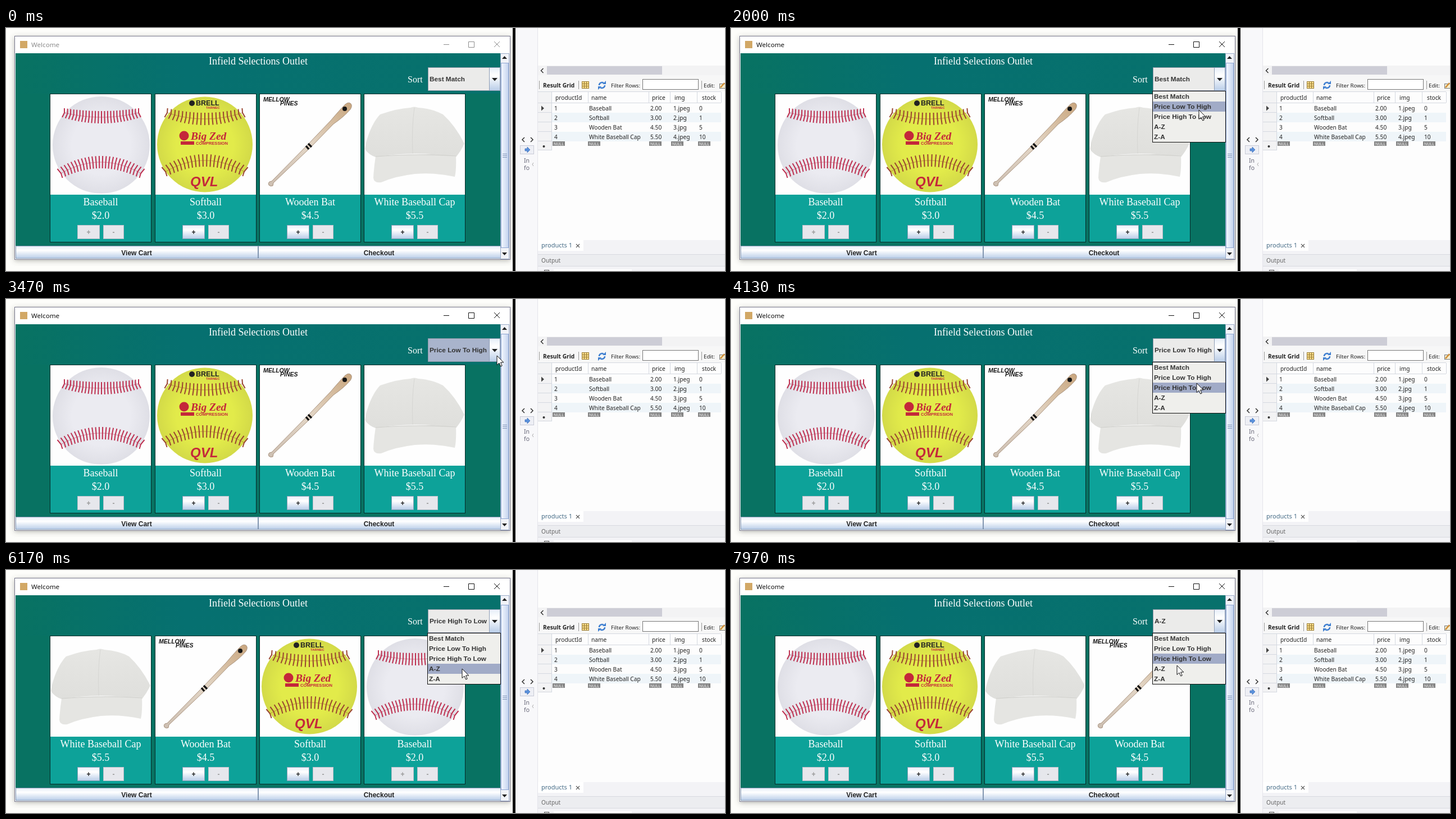
Animation, 1280 px wide and 433 px high, one loop 8 s. Source, as an HTML page:

```html
<!DOCTYPE html>
<html lang="en">
<head>
<meta charset="utf-8">
<title>Store demo</title>
<style>
  html, body { margin: 0; height: 100%; overflow: hidden; background: #fdfdfb; }
  svg { display: block; width: 100vw; height: 100vh; }
  .serif { font-family: "Liberation Serif", Times, serif; }
  .bold { font-family: "Liberation Sans", Arial, sans-serif; font-weight: bold; }
  .ui { font-family: "Noto Sans", "Open Sans", sans-serif; }
  .mid { text-anchor: middle; }
  .strong { font-weight: bold; }
  .italic { font-style: italic; }
</style>
</head>
<body>
<svg id="stage" viewBox="0 0 1280 433" preserveAspectRatio="none">
  <defs>
    <linearGradient id="metal" x2="0" y2="1">
      <stop stop-color="#e6eef8"/><stop offset=".35" stop-color="#fff"/><stop offset="1" stop-color="#b9cde8"/>
    </linearGradient>
    <linearGradient id="thumb">
      <stop stop-color="#f4f8ff"/><stop offset="1" stop-color="#c4d3ee"/>
    </linearGradient>
    <linearGradient id="panel">
      <stop stop-color="#087262"/><stop offset=".35" stop-color="#067070"/><stop offset="1" stop-color="#07716c"/>
    </linearGradient>
    <radialGradient id="white"><stop offset=".6" stop-color="#ebebf1"/><stop offset="1" stop-color="#dfdfe6"/></radialGradient>
    <radialGradient id="lime"><stop offset=".6" stop-color="#e2eb4a"/><stop offset="1" stop-color="#d3da48"/></radialGradient>
    <linearGradient id="wood" x1="0" y1="1" x2="1" y2="0">
      <stop stop-color="#cdbfb2"/><stop offset=".5" stop-color="#e3d6c6"/><stop offset="1" stop-color="#c9a67e"/>
    </linearGradient>
    <linearGradient id="cloth" x2="0" y2="1">
      <stop stop-color="#e6e6e3"/><stop offset="1" stop-color="#dfdfdc"/>
    </linearGradient>
    <filter id="shade" x="-5%" y="-5%" width="110%" height="112%">
      <feDropShadow dx="0" dy="2" stdDeviation="5" flood-color="#55554a" flood-opacity=".4"/>
    </filter>
  </defs>
  <g id="desk"></g><g id="cards"></g><g id="combo"></g>
  <path id="cursor" d="M0 0V16.5L4 13L6.7 19L9.2 18L6.6 12H11.8Z" fill="#fff" stroke="#111"/>
</svg>
<script>
const $ = id => document.getElementById(id);
const text = (x, y, s, size, fill, cls = "ui") =>
  `<text x="${x}" y="${y}" font-size="${size}" fill="${fill}" class="${cls}">${s}</text>`;
const rect = (x, y, w, h, fill, stroke = "none") =>
  `<rect x="${x}" y="${y}" width="${w}" height="${h}" fill="${fill}" stroke="${stroke}"/>`;
const path = (d, stroke, width = 1, fill = "none") =>
  `<path d="${d}" stroke="${stroke}" stroke-width="${width}" fill="${fill}"/>`;
const disc = (x, y, r, fill) => `<circle cx="${x}" cy="${y}" r="${r}" fill="${fill}"/>`;

// Stitches across the parabola y = cy + bend * u², shorter towards its ends
function seam(cx, cy, w, bend, count, color) {
  let d = "", line = "";
  for (let i = 0; i <= count; i++) {
    const u = i / count * 2 - 1, x = cx + u * w, y = cy + bend * u * u;
    const leg = 11 - 3 * u * u, lean = 2 * bend * u / w * leg, splay = u * 2;
    d += `M${x + lean + splay} ${y - leg}L${x} ${y}L${x - lean + splay} ${y + leg}`;
    line += (i ? "L" : "M") + x + " " + y;
  }
  return path(line, color, .5) + path(d, color, 2);
}

const RED = "#c4273a", THREAD = "#bd3050", STITCH = "#9a4530";
const products = {
  ball: { name: "Baseball", price: "$2.0", soldOut: true, art:
    disc(90.5, 90.5, 86.5, "url(#white)") +
    seam(91, 41, 66, -8, 24, THREAD) + seam(90, 121, 71, 20, 25, THREAD) },
  soft: { name: "Softball", price: "$3.0", art:
    disc(88, 89.5, 85, "url(#lime)") +
    seam(88, 44, 67, -11, 20, STITCH) + seam(88, 118, 70, 20, 21, STITCH) +
    disc(65, 16, 5, "#222") + text(72, 20, "BRELL", 12.5, "#222", "bold") +
    text(90, 26, "TARNEC", 6, RED, "bold") +
    disc(51, 74, 8.5, RED) + text(63, 81, "Big Zed", 19.5, RED, "serif strong italic") +
    rect(45, 84, 24, 6, RED) + text(72, 90, "COMPRESSION", 7.6, RED, "bold") +
    text(62, 164, "QVL", 24, RED, "bold italic") },
  bat: { name: "Wooden Bat", price: "$4.5", art:
    path("M16 162Q14 158 17 156L21 155L85 90L126 47Q142 28 152 18Q158 13 162 17Q165 21 161 27Q150 40 131 53L90 95L24 158L23 163Q19 165 16 162Z", "#a8927e", 1, "url(#wood)") +
    path("M82 92L87 98M86 88L92 94", "#151515", 3.5) + disc(151, 26, 4, "#151515") +
    text(6, 13, "MELLOW", 10.5, "#151515", "bold italic") +
    text(36, 20, "PINES", 10.5, "#151515", "bold italic") },
  cap: { name: "White Baseball Cap", price: "$5.5", art:
    path("M1 98C3 80 14 50 28 36Q60 25 82 24Q89 21 96 24Q122 26 140 36Q162 56 178 88Q172 101 163 112Q90 100 20 112Q8 108 1 98Z", "none", 0, "url(#cloth)") +
    path("M89 24Q84 60 86 106", "#d6d6d3", 1) +
    path("M20 111Q90 104 163 109Q164 135 161 147Q125 139 90 142Q55 146 30 157Q17 159 16 149Q17 130 20 111Z", "none", 0, "#e5e5e2") +
    path("M20 111Q90 105 163 110", "#cfcfcb", 1.2) }
};
const orders = [["ball", "soft", "bat", "cap"], ["cap", "bat", "soft", "ball"], ["ball", "soft", "cap", "bat"]];

function button(x, label, on) {
  const w = label == "+" ? 39 : 36;
  return rect(x + .5, 351.5, w, 24, on ? "url(#metal)" : "#e6e7ec", on ? "#8b9fb5" : "#bcbcc8") +
    text(x + .5 + w / 2, 368, label, 12, on ? "#222" : "#999", "bold mid");
}
function card(id, i) {
  const p = products[id], x = [78, 265, 451, 637][i];
  return rect(x + .5, 117.5, 180, 264, "#0da299", "#052a28") + rect(x + 1, 118, 179, 179, "#fefefe") +
    `<g transform="translate(${x + 1} 118)">${p.art}</g>` +
    text(x + 90.5, 316, p.name, 18, "#fff", "serif mid") + text(x + 90.5, 340, p.price, 18, "#fff", "serif mid") +
    button(x + 49, "+", !p.soldOut) + button(x + 95, "-", false);
}

function storeWindow() {
  return `<g filter="url(#shade)">${rect(15.5, 14.5, 882, 398, "#fff", "#77778c")}</g>` +
    rect(25, 23, 13, 13, "#d2a866") +
    `<g id="title">${text(45, 34, "Welcome", 11.6, "currentColor")}` +
    path("M779 29.5h10M823.5 24.5h10v10h-10zM869 24l10 10m0-10l-10 10", "currentColor") + "</g>" +
    rect(17, 45, 863, 343, "#087262") + rect(17, 45, 863, 72, "url(#panel)") +
    text(449, 65, "Infield Selections Outlet", 18, "#fff", "serif mid") +
    text(715, 97, "Sort", 16, "#fff", "serif") +
    rect(17.5, 388.5, 431, 22, "url(#metal)", "#8296b0") + rect(449.5, 388.5, 431, 22, "url(#metal)", "#8296b0") +
    text(232.5, 405, "View Cart", 12, "#222", "bold mid") + text(664, 405, "Checkout", 12, "#222", "bold mid") +
    rect(880.5, 45.5, 15, 366, "#f1f3f8", "#9aabc8") + rect(881.5, 62.5, 13, 329, "url(#thumb)", "#8fa6d2") +
    path("M884 224.5h8m-8 3h8m-8 3h8", "#8296b8") +
    path("M883 55h9l-4.5-5zM883 400h9l-4.5 5z", "none", 0, "#222");
}

function database() {
  const ink = "#222", dim = "#667", grid = "#d4d8e0";
  const cols = [[978, 976, 973], [1042, 1038, 1036], [1150, 1147, 1145], [1190, 1188, 1184], [1239, 1234, 1232]];
  const rows = ["productId name price img stock", "1 Baseball 2.00 1.jpeg 0", "2 Softball 3.00 2.jpg 1",
    "3 Wooden_Bat 4.50 3.jpg 5", "4 White_Baseball_Cap 5.50 4.jpeg 10"];
  let s = rect(907, 0, 39, 433, "#f8f8fa") + rect(946, 0, 334, 433, "#fdfdfd") + rect(902, 0, 5, 433, "#111") +
    rect(946, 67, 334, 17, "#f3f3f4") + rect(963, 68, 205, 15, "#cdcdd6") + rect(946, 84, 334, 29, "#f7f7f7") +
    path("M956.5 72l-4 4 4 4M923 195l-4 4 4 4M934 195l4 4-4 4", "#333", 1.5) +
    rect(915.5, 209.5, 24, 15, "#eeeff5", "#c8cad6") + path("M924 215h4v-3l5 5-5 5v-3h-4z", "#3569b5", .7, "#5b92dc") +
    text(927, 240, "In", 10.5, dim, "ui mid") + text(927, 253, "fo", 10.5, dim, "ui mid") +
    path("M939 240l-2 3 2 3", "#aaa") +
    path("M949.5 94v15M1019.5 94v15M1238.5 94v15", "#999") +
    text(956, 106, "Result Grid", 10.2, ink, "ui strong") +
    rect(1025.5, 95.5, 12, 12, "#f6dc8c", "#9a7b30") + path("M1026 99.5h12m-12 4h12M1029.5 96v12m4-12v12", "#9a7b30") +
    path("M1056 102a5 5 0 0 1 8-4M1066 102a5 5 0 0 1-8 4", "#3f7fd0", 2.5) +
    path("M1062 100h6v-6zM1060 104h-6v6z", "none", 0, "#3f7fd0") +
    text(1077, 106, "Filter Rows:", 9.7, ink) + rect(1133.5, 91.5, 99, 18, "#fff", "#777") +
    text(1242, 106, "Edit:", 9.7, ink) + rect(1270.5, 99.5, 12, 8, "#f4edcf", "#777") +
    path("M1272 106l7-8", "#d18c32", 2.5) +
    rect(947, 114, 24, 104, "#f3f3f4") + rect(971, 151, 302, 17, "#eff5f9") + rect(971, 185, 302, 17, "#eff5f9") +
    path("M947 113.5h326M947 133.5h326M947 150.5h24M947 167.5h24M947 184.5h24M947 201.5h24M947 217.5h24M971.5 114v104M1036.5 114v19M1144.5 114v19M1182.5 114v19M1230.5 114v19M1273.5 114v19", grid) +
    path("M953 138.5l5 4.5-5 4.5z", "none", 0, "#444") + disc(957.5, 211, 2, "#333");
  rows.forEach((row, r) => row.split(" ").forEach((cell, c) => {
    s += text(cols[c][r ? 1 : 0], r ? 129.5 + 17 * r : 128, cell.replaceAll("_", " "), 10.2, ink);
  }));
  for (const [, , x] of cols)
    s += rect(x, 202, 22, 8, "#858585") + text(x + 11, 209, "NULL", 7, "#fff", "ui mid");
  return s + rect(946, 378, 334, 55, "#f3f3f6") + rect(946, 378, 82, 19, "#fff") +
    text(953, 391, "products 1", 11, "#446a85") + path("M1015 385l6 6m0-6l-6 6", "#555", 1.2) +
    rect(946, 404, 334, 20, "#ecedf0") + path("M946 403.5h334M946 424.5h334", "#d8dae0") +
    text(953, 418, "Output", 10.2, "#666") + rect(958.5, 431.5, 8, 4, "#fff", "#555") +
    rect(975, 430, 139, 3, "#fff") + path("M946.5 0v433", "#e4e4ea");
}

const options = ["Best Match", "Price Low To High", "Price High To Low", "A-Z", "Z-A"];
function combo(sel, open, focused, hover) {
  let s = rect(751.5, 70.5, 109, 41, focused ? "#a9b4cc" : "#ebebea", "#8f98a8") +
    rect(860.5, 70.5, 19, 41, "url(#metal)", "#8f9db4") + path("M865 89h10l-5 5.5z", "none", 0, "#222") +
    text(754, 95, options[sel], 11.8, "#333", "bold");
  if (open) {
    s += rect(750.5, 112.5, 130, 91, "#efefec", "#111") + rect(751, 113 + 18 * hover, 129, 18, "#a1abc7");
    options.forEach((o, i) => s += text(753, 126 + 18 * i, o, 11.8, "#333", "bold"));
  }
  return s;
}

// Pointer stops: time, x, y
const stops = [[300, 1300, 260], [1050, 870, 98], [1450, 870, 98], [1900, 833, 146], [2500, 833, 146],
  [3100, 874, 101], [3750, 874, 101], [4050, 829, 150], [4130, 829, 150], [4300, 829, 155], [4500, 829, 155],
  [5100, 871, 101], [5500, 871, 101], [6050, 812, 176], [6450, 812, 176], [6700, 818, 178], [6950, 818, 178],
  [7350, 868, 98], [7550, 868, 98], [7800, 812, 140], [7900, 798, 162], [7970, 794, 170], [8000, 793, 173]];
function pointer(t) {
  const i = stops.findIndex(s => s[0] > t);
  if (i < 1) return stops[0].slice(1);
  const [a, b] = [stops[i - 1], stops[i]], k = (t - a[0]) / (b[0] - a[0]), e = k * k * (3 - 2 * k);
  return [a[1] + (b[1] - a[1]) * e, a[2] + (b[2] - a[2]) * e];
}

const LOOP = 8000, menus = [[1250, 2350], [3700, 4400], [5450, 6350], [7500, LOOP]];
let shownOrder, shownCombo;
function draw(t) {
  const sel = menus.filter(m => t >= m[1]).length;
  const open = menus.some(m => t >= m[0] && t < m[1]), active = t >= menus[0][0];
  const y = pointer(t - 60)[1];  // the highlight trails the pointer a little
  const hover = y >= 113 && y < 203 ? Math.floor((y - 113) / 18) : sel;
  const order = Math.max(0, sel - 1), key = [sel, open, active, hover].join();
  if (order !== shownOrder) $("cards").innerHTML = orders[shownOrder = order].map(card).join("");
  if (key !== shownCombo) {
    shownCombo = key;
    $("combo").innerHTML = combo(sel, open, active && !open, hover);
    $("title").style.color = active ? "#111" : "#8c8c8c";
  }
  $("cursor").setAttribute("transform", `translate(${pointer(t)})`);
}

$("desk").innerHTML = rect(0, 0, 903, 433, "#fdfdfa") + storeWindow() + database();
const start = performance.now();
function tick() {
  draw((performance.now() - start) % LOOP);
  requestAnimationFrame(tick);
}
tick();
</script>
</body>
</html>
```
